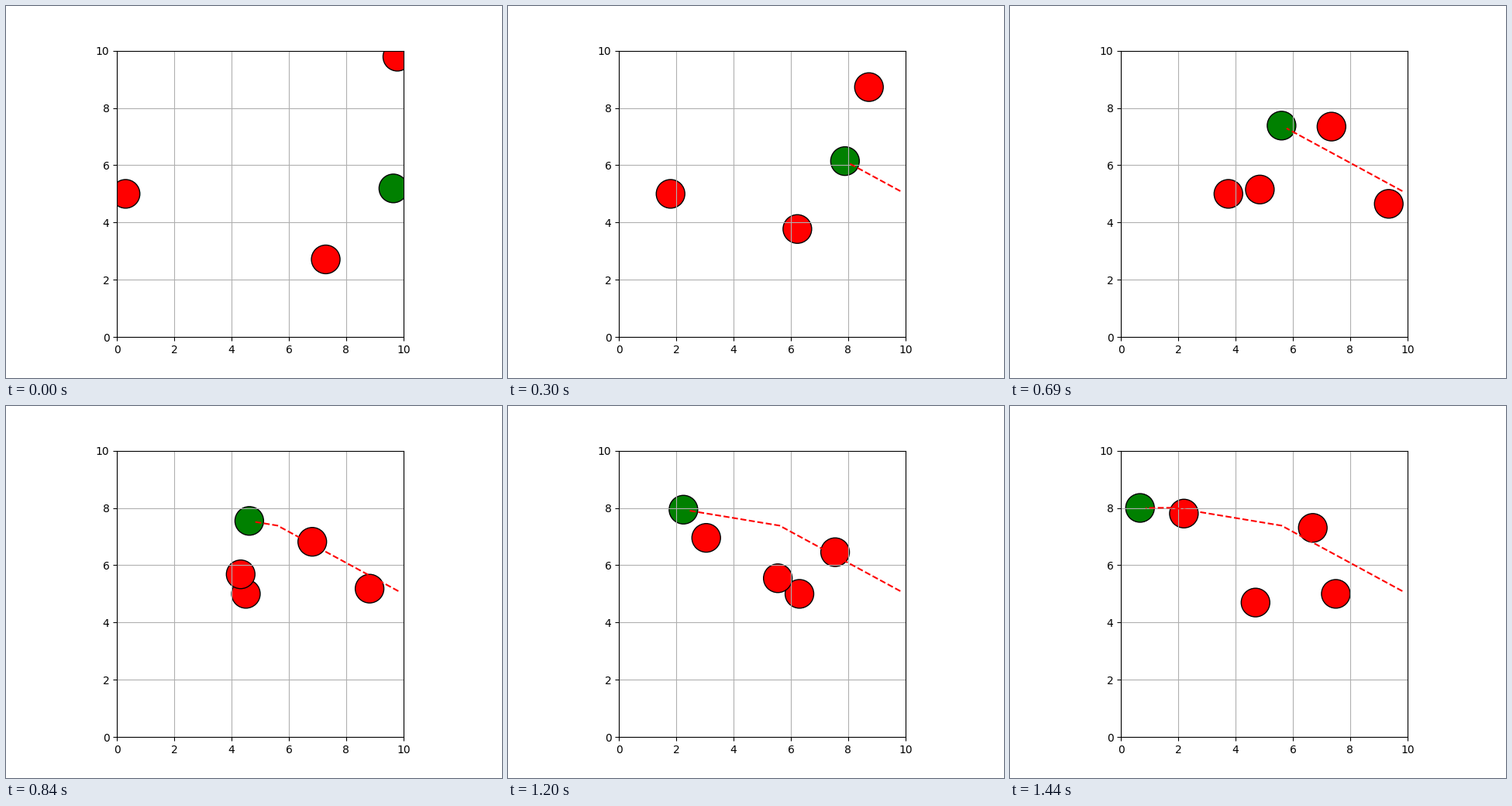
A matplotlib script that plays this animation: 640 by 480 pixels, repeating every 1470 ms.

```python
import numpy as np
import matplotlib.pyplot as plt
from matplotlib.animation import FuncAnimation

FRAMES = 49
STEP_MS = 30
RADIUS = 0.5
SPEED = 0.15
DIAG = SPEED / np.sqrt(2)

# Obstacles: start position and displacement per step
OBSTACLES = [
    ((0, 5), (SPEED, 0)),
    ((7.5, 2.5), (-DIAG, DIAG)),
    ((10, 10), (-DIAG, -DIAG)),
    ((12, 2), (-DIAG, DIAG)),
]

# Robot path: steps at which the heading changes, and the points there
TURN_STEPS = [0, 25, 44, 50]
TURN_X = [10, 5.605, 1.856, 0.665]
TURN_Y = [5, 7.383, 8.005, 8.0]


def robot_at(step):
    return np.interp(step, TURN_STEPS, TURN_X), np.interp(step, TURN_STEPS, TURN_Y)


def add_disc(color):
    disc = plt.Circle((0, 0), RADIUS, facecolor=color, edgecolor="k", linewidth=1)
    return ax.add_patch(disc)


plt.rcParams["font.family"] = "DejaVu Sans"
fig, ax = plt.subplots(figsize=(6.4, 4.8), dpi=100)
ax.set_aspect("equal")
ax.set_xlim(0, 10)
ax.set_ylim(0, 10)
ax.grid(True)

balls = [add_disc("red") for _ in OBSTACLES]
robot = add_disc("green")
trail, = ax.plot([], [], "r--")


def update(frame):
    step = frame + 2
    for ball, ((x, y), (dx, dy)) in zip(balls, OBSTACLES):
        ball.center = (x + dx * step, y + dy * step)
    robot.center = robot_at(step)
    # The trail stays one step behind the robot
    trail.set_data(*robot_at(np.arange(1, step)))
    return [*balls, robot, trail]


anim = FuncAnimation(fig, update, frames=FRAMES, interval=STEP_MS,
                     init_func=lambda: update(0), repeat=True, repeat_delay=0)
plt.show()
```
